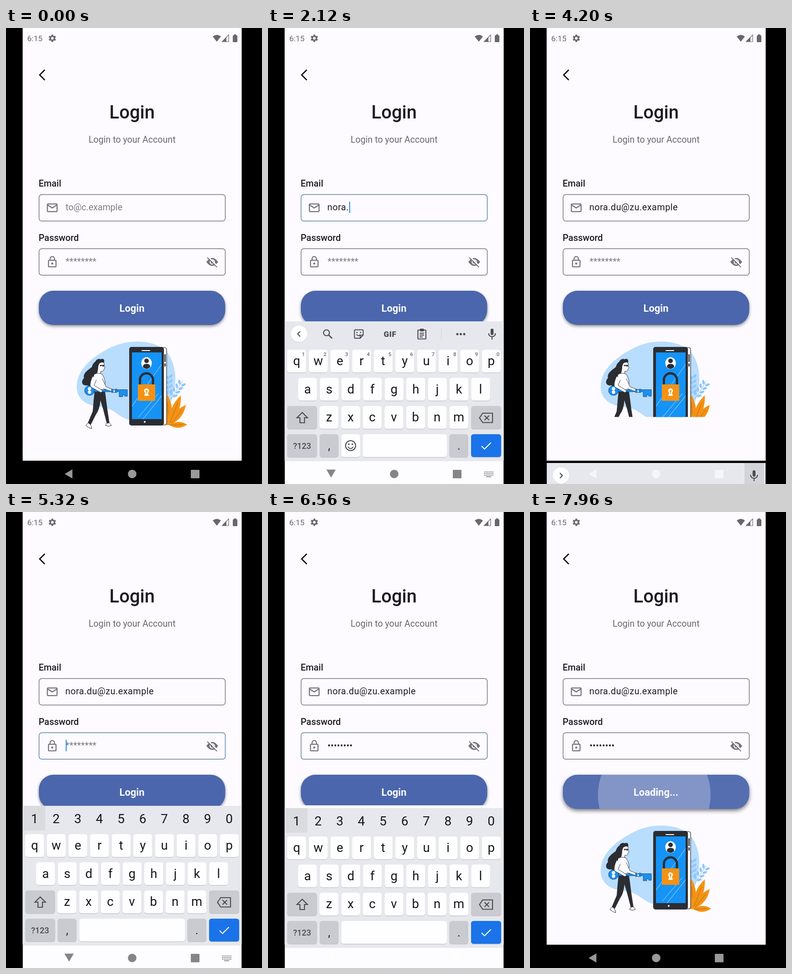
Recreate the animation shown at these times as an HTML page with a canvas. Size 561x998 px, loop 8 s.

```html
<!DOCTYPE html>
<html lang="en">
<head>
<meta charset="utf-8">
<title>Login screen</title>
<style>
html, body { margin: 0; width: 100%; height: 100%; overflow: hidden; background: #000; }
canvas { display: block; width: 561px; height: 998px; }
</style>
</head>
<body>
<canvas id="stage"></canvas>
<script>
const W = 561, H = 998, LOOP = 8000, STEP = 40;
const EMAIL = 'nora.du@zu.example', HINT = 'to@c.example', SECRET = 'password';
const INK = '#1d1b1f', GRAY = '#737277', KEY_INK = '#4a4b50', DARK = '#2b2d33', PAGE = '#fdfbff';
const SESSIONS = [
  { focus: 740, open: 840, close: 4060 },
  { focus: 4940, open: 5040, close: 6540, secret: true }
];
const PRESS = 7440, LOADED = 7840;

const canvas = document.getElementById('stage');
const c = canvas.getContext('2d');
const dpr = window.devicePixelRatio || 1;
canvas.width = W * dpr;
canvas.height = H * dpr;

const clamp = (v, a = 0, b = 1) => Math.min(b, Math.max(a, v));
const easeOut = u => 1 - (1 - clamp(u)) ** 3;

function text(s, x, y, size, color, weight = 400, align = 'left', spacing = 0) {
  c.font = `${weight} ${size}px Roboto, sans-serif`;
  c.letterSpacing = spacing + 'px';
  c.textAlign = align;
  c.fillStyle = color;
  c.fillText(s, x, y);
  const w = c.measureText(s).width;
  c.letterSpacing = '0px';
  return w;
}
function box(x, y, w, h, r, fill, line, lw = 1) {
  c.beginPath();
  c.roundRect(x, y, w, h, r);
  paint(fill, line, lw);
}
function paint(fill, line, lw = 1) {
  if (fill) { c.fillStyle = fill; c.fill(); }
  if (line) { c.strokeStyle = line; c.lineWidth = lw; c.stroke(); }
}
function shape(d, fill, line, lw = 1) {
  const p = new Path2D(d);
  if (fill) { c.fillStyle = fill; c.fill(p); }
  if (line) { c.strokeStyle = line; c.lineWidth = lw; c.stroke(p); }
}
function oval(x, y, rx, ry, rot, fill, line, lw = 1) {
  c.beginPath();
  c.ellipse(x, y, rx, ry, rot, 0, 7);
  paint(fill, line, lw);
}
const disc = (x, y, r, fill, line, lw) => oval(x, y, r, r, 0, fill, line, lw);

function statusBar() {
  const g = '#68676b';
  text('6:15', 46.5, 29, 17.4, g);
  disc(101.5, 22.5, 4.5, null, g, 3.2);
  for (let i = 0; i < 6; i++) {
    const a = i * Math.PI / 3 + Math.PI / 6;
    c.beginPath();
    c.moveTo(101.5 + 5 * Math.cos(a), 22.5 + 5 * Math.sin(a));
    c.lineTo(101.5 + 8 * Math.cos(a), 22.5 + 8 * Math.sin(a));
    paint(null, g, 4);
  }
  shape('M453 18.5Q462 11.5 471 18.5L462 30Z', g);
  shape('M488 15V30H473.5Z', null, g, 1.2);
  shape('M483 20.5V30H473.5Z', g);
  box(497, 16, 10, 15, 1.5, g);
  box(499.5, 14, 5, 3, 0, g);
}

function field(y, focus) {
  const mix = (a, b) => Math.round(a + (b - a) * focus);
  box(72.5, y + .5, 408, 58, 6, null, `rgb(${mix(118, 92)},${mix(116, 128)},${mix(121, 170)})`, 1.5);
}
function mailIcon() {
  box(90.7, 385.2, 21.2, 16.6, 1.3, null, GRAY, 2.3);
  shape('M91 387.2L101.3 393.8L111.6 387.2', null, GRAY, 2.3);
}
function lockIcon() {
  box(93.1, 508.4, 16.5, 14.2, 1.2, null, GRAY, 2.3);
  shape('M96.6 508V504.8A4.7 4.7 0 0 1 106 504.8V508', null, GRAY, 2.2);
  disc(101.3, 515.5, 2.3, GRAY);
}
function hiddenIcon() {
  shape('M439 512Q452 494.5 465 512Q452 529.5 439 512Z', GRAY);
  disc(452, 512, 5.8, PAGE);
  disc(452, 512, 3.5, GRAY);
  shape('M442.5 500.5L464.5 522.5', null, PAGE, 2.6);
  shape('M441 502.2L462.4 523.6', null, GRAY, 2);
}

function button(t) {
  const p = clamp((t - PRESS) / 200);
  c.save();
  c.shadowColor = `rgba(0,0,0,${.42 + .08 * p})`;
  c.shadowBlur = (6 + 2 * p) * dpr;
  c.shadowOffsetY = (3 + p) * dpr;
  box(72, 575, 408.5, 75, 32, '#4b66ac');
  c.restore();
  if (p) {
    c.save();
    box(72, 575, 408.5, 75, 32, `rgba(255,255,255,${.05 * p})`);
    c.clip();
    const r = 50 + 73.5 * Math.sin(clamp((t - PRESS) / 520) * Math.PI / 2);
    disc(272.3, 619, r, `rgba(255,255,255,${.27 * p})`);
    c.restore();
  }
  text(t < LOADED ? 'Login' : 'Loading...', 276, 620.6, 21.9, '#fcfcff', 700, 'center');
}

function leaf(x, y, tipX, tipY, w) {
  const mx = (x + tipX) / 2, my = (y + tipY) / 2;
  const len = Math.hypot(tipX - x, tipY - y);
  const nx = (y - tipY) / len * w, ny = (tipX - x) / len * w;
  shape(`M${x} ${y}Q${mx + nx} ${my + ny} ${tipX} ${tipY}Q${mx - nx} ${my - ny} ${x} ${y}Z`, '#f59214');
  shape(`M${x} ${y}L${mx} ${my}L${(mx + tipX) / 2} ${(my + tipY) / 2}`, null, '#9a641c', .8);
}
function plants() {
  const sky = '#8fc7fb';
  shape('M352 812Q358 790 356 762M362 812Q372 795 386 774', null, sky, 1.3);
  for (let i = 0; i < 4; i++) {
    const y = 762 + i * 11;
    oval(352.5, y + 2, 2.6, 5, -.6, sky);
    oval(361, y, 2.6, 5, .7, sky);
    const x = 385 - i * 6;
    oval(x - 5, 775 + i * 8, 2.6, 5, -.1, sky);
    oval(x + 4, 781 + i * 8, 2.6, 5.2, 1.2, sky);
  }
  leaf(356, 868, 354, 803, 17);
  leaf(358, 867, 383, 804, 16);
  leaf(360, 868, 394, 825, 15);
  leaf(358, 869, 397, 868, 13);
  shape('M351 835Q358 848 360 869H351Z', '#f59214');
}

function phone() {
  box(340, 699, 12, 170, 5, PAGE, DARK, 1.2);
  box(347.2, 714, 2.6, 17, 1, DARK);
  box(347.2, 734, 2.6, 7, 1, DARK);
  box(270, 698, 76, 172, 5, DARK);
  box(276, 710, 65, 146, 0, '#1593f6');
  c.save();
  c.beginPath();
  c.rect(276, 710, 65, 146);
  c.clip();
  shape('M342 735L276 828M334 800L290 852M342 804L300 856', null, 'rgba(190,225,255,.75)', 1.1);
  c.restore();
  box(297, 705, 19, 2, 1, '#fff');
  disc(304, 862, 2, '#fff');
  oval(308, 733.5, 11.5, 13, 0, '#fff');
  disc(308, 728.5, 5, DARK);
  shape('M300 742Q300 735 308 735Q316 735 316 742Q308 750 300 742Z', DARK);
  shape('M293.5 781V770A14.2 14.2 0 0 1 322 770V781', null, DARK, 5);
  box(289, 780, 38, 36, 1, '#f59214');
  disc(308, 794, 5.3, '#fff');
  shape('M305.5 797H310.5L313 805H303Z', '#fff');
  disc(308, 794.5, 2, '#f59214');
  shape('M308 795V801', null, '#f59214', 1.4);
}

function woman() {
  shape('M204 729C195 727 190 735 188 742C181 748 168 755 171 766C163 774 167 784 178 782C186 787 194 780 193 771C199 763 200 752 206 742Z', DARK);
  shape('M201 733Q207 728 215 733L215 738L217 744L215 746Q214 753 208 751L207 758H198Q203 748 201 733Z', PAGE, DARK, .9);
  shape('M195 737C194 727 201 722 208 725C212 722 217 726 215 732Q208 731 204 735L201 744Z', DARK);
  shape('M205 737.5H215V740Q212 742.5 210 739Q207 742 205 737.5Z', DARK);
  shape('M193 758Q203 753 211 758Q220 773 216 783L217 796H194Q195 784 190 775Z', PAGE, DARK, .9);
  shape('M194 795H217Q220 818 222 834L227 866H221L213 835L207 815Q205 836 197 846L186 868L179 865L190 839Q192 815 194 795Z', DARK);
  shape('M180 864L175 870Q182 876 188 877Q188 872 184 867ZM221 865L218 870Q225 873 231 870Q229 866 226 864Z', PAGE, DARK, 1);
}
function bigKey() {
  const blue = '#1b8ff0', edge = '#174a7c';
  oval(183, 793.5, 10.8, 10.5, 0, blue, edge, 1);
  disc(183, 789.5, 3.7, '#fff');
  disc(183, 797, 3.7, '#fff');
  shape('M193 791.5H266V806H260V803H256V807H248V796H193Z', blue, edge, .9);
  shape('M190 762Q183 776 185 785L208 798L212 794L193 782L198 770', PAGE, DARK, .9);
  shape('M211 767L219 785L233 791L241 793L238 798L213 789', PAGE, DARK, .9);
  box(231, 790, 4, 8, 1, blue, edge, .8);
  box(239, 790, 4, 8, 1, blue, edge, .8);
}
function picture() {
  shape('M272 858C246 853 241 833 206 829C172 826 154 810 155 783C157 741 198 715 232 698C275 679 326 684 351 707C366 725 372 750 371 772C369 800 362 825 345 850Z', '#b8ddfd');
  plants();
  phone();
  woman();
  bigKey();
}

function key(x, y, w, fill = '#fefdff') {
  box(x, y + 1.2, w, 50, 5.5, '#bfc1c6');
  box(x, y, w, 50, 5.5, fill);
}
function micIcon() {
  box(487.8, 658, 6.4, 14, 3.2, KEY_INK);
  shape('M483.5 668Q484 675.5 491 675.5Q498 675.5 498.5 668M491 675.5V682', null, KEY_INK, 2.2);
}
function toolbar(t, composing) {
  if (composing) box(470, 642, 43, 55, 0, '#d2d4d9');
  else if (t < 1600) box(96, 642, 68, 54, 0, '#d5d7db');
  disc(68, 670.6, 18, '#c9cbd0');
  disc(68, 669.6, 18, '#fefdff');
  shape(composing ? 'M65.5 664L71 669.6L65.5 675.2' : 'M70.5 664L65 669.6L70.5 675.2', null, KEY_INK, 2.2);
  micIcon();
  if (composing) return;
  disc(128.2, 667, 6.5, null, KEY_INK, 2.2);
  shape('M133 672L140.5 679.5', null, KEY_INK, 2.6);
  shape('M191 660.5H207Q208.5 660.5 208.5 662V672L202 679H191Q189.5 679 189.5 677.5V662Q189.5 660.5 191 660.5ZM202 679V672.5H208.5M194 670.5Q198 676 202 671', null, KEY_INK, 2);
  disc(195, 666.5, 1.4, KEY_INK);
  disc(203, 666.5, 1.4, KEY_INK);
  text('GIF', 267.5, 675.5, 17, KEY_INK, 900, 'center', .6);
  box(328.5, 661, 17.5, 19.5, 1.5, null, KEY_INK, 2.2);
  box(333, 658, 8.5, 6, 1.5, KEY_INK);
  shape('M332.5 668H342M332.5 672H342M332.5 676H339', null, KEY_INK, 1.8);
  box(379.5, 656, 1, 27, 0, '#cfd1d6');
  for (const x of [415, 422.5, 430]) disc(x, 670, 2.5, KEY_INK);
}
function keyRow(letters, x, y, marks) {
  [...letters].forEach((ch, i) => {
    const kx = x + i * 47.4;
    key(kx, y, 41.5);
    text(ch, kx + 20.7, y + 34, 27.5, '#161619', 400, 'center');
    if (marks) text((i + 1) % 10, kx + 35.5, y + 13.5, 11.5, '#67686d', 500, 'center');
  });
}
function keyboard(t, s, composing) {
  const gray = '#c9cbd1';
  box(36.5, 642, 480, 306, 0, '#e6e8ed');
  box(36.5, 948, 480, 50, 0, '#fdfcff');
  if (s.secret) {
    box(39, 642, 47, 54, 0, '#d9dbdf');
    for (let i = 0; i < 10; i++) text((i + 1) % 10, 62.5 + i * 47.4, 680, 28, '#161619', 400, 'center');
  } else toolbar(t, composing);
  keyRow('qwertyuiop', 42, 704, !s.secret);
  keyRow('asdfghjkl', 66, 765.5);
  keyRow('zxcvbnm', 113, 827.3);
  key(42, 827.3, 65.5, gray);
  key(445, 827.3, 66, gray);
  shape('M75 841.5L86.5 853H80V864H70V853H63.5Z', null, KEY_INK, 2.2);
  shape('M470.5 843H492V863.5H470.5L463.5 853.2ZM474.5 848.2L484.5 858.2M484.5 848.2L474.5 858.2', null, KEY_INK, 2.2);
  key(42, 889, 65.5, gray);
  text('?123', 74.7, 921, 18, KEY_INK, 500, 'center');
  key(113, 889, 41.5, gray);
  text(',', 134, 923, 25, '#242428', 400, 'center');
  if (!s.secret) {
    key(160.5, 889, 41.5);
    disc(181, 914, 11, null, KEY_INK, 2.1);
    disc(177.2, 911, 1.8, KEY_INK);
    disc(184.8, 911, 1.8, KEY_INK);
    shape('M175 916.5Q181 924.5 187 916.5', null, KEY_INK, 2);
  }
  const space = s.secret ? 160.5 : 207.5;
  key(space, 889, 392 - space);
  key(397.5, 889, 41.5, gray);
  text('.', 418.3, 923, 25, '#242428', 400, 'center');
  key(445, 889, 66, '#1a73e8');
  shape('M468 915L474.5 921.5L488.5 907.5', null, '#fff', 2.2);
}

function navIcons(light) {
  const col = light ? '#858588' : 'rgba(255,255,255,.6)';
  shape(light ? 'M128 966.5H148.5L138.2 984Z' : 'M128.5 976L145.5 966V986Z', col);
  disc(276.5, 976, 9.3, col);
  box(405, 967, 19, 18.5, 1, col);
  if (!light) return;
  for (let r = 0; r < 3; r++)
    for (let i = 0; i < 6; i++) box(473.5 + i * 3.6, 970.5 + r * 3.6, 2.2, 2.2, 0, col);
  box(478, 981.3, 11, 1.8, 0, col);
}

const slide = (s, t) => {
  if (!s) return 356;
  if (t >= s.close) return 356 * clamp((t - s.close) / 150) ** 2;
  return 356 * (1 - easeOut((t - s.open) / 320));
};
const focusOf = (s, t) => clamp((t - s.focus) / 150) * (1 - clamp((t - s.close) / 100));

function emailTyping(t) {
  const second = t >= 2240;
  const start = second ? 2240 : 1600, step = second ? 130 : 120;
  const k = Math.floor((t - start) / step);
  const n = clamp(k + 1 + (second ? 5 : 0), 0, second ? EMAIL.length : 5);
  const last = n ? start + step * Math.min(k, second ? 12 : 4) : SESSIONS[0].focus;
  return { n, last };
}
function secretTyping(t) {
  const k = Math.floor((t - 5660) / 120);
  const n = clamp(k + 1, 0, SECRET.length);
  return { n, last: n ? 5660 + 120 * (n - 1) : SESSIONS[1].focus };
}
function caret(s, t, last, x, y) {
  if (t < s.focus || t >= s.close || (t - last) % 1000 >= 500) return;
  box(x, y, 2.2, 25, 0, '#2f93e4');
}

function draw(t) {
  c.setTransform(dpr, 0, 0, dpr, 0, 0);
  box(0, 0, W, H, 0, '#000');
  box(36.5, 0, 480, 947, 0, PAGE);
  statusBar();

  const s = SESSIONS.find(v => t >= v.open && t < v.close + 150);
  const shift = Math.round(slide(s, t));

  // The page body is cut where the keyboard inset was a moment ago.
  c.save();
  c.beginPath();
  c.rect(36.5, 0, 480, Math.min(947, 642 + slide(s, t - 25)));
  c.clip();
  shape('M85 91.5L73.8 102.8L85 114', null, '#111', 2.8);
  text('Login', 276.3, 198.2, 40, INK, 500, 'center');
  text('Login to your Account', 276.3, 250.8, 19.6, '#69686d', 400, 'center');
  text('Email', 71.5, 347, 19.9, INK, 500);
  text('Password', 71.5, 465.5, 19.9, INK, 500);
  field(364, focusOf(SESSIONS[0], t));
  field(482.5, focusOf(SESSIONS[1], t));
  mailIcon();
  lockIcon();
  hiddenIcon();

  const mail = emailTyping(t), pass = secretTyping(t);
  let w = 0;
  if (mail.n) w = text(EMAIL.slice(0, mail.n), 130, 399, 19.8, INK, 400, 'left', .5);
  else text(HINT, 130.5, 399, 19.6, '#7d7c81');
  caret(SESSIONS[0], t, mail.last, 130.8 + w, 380);

  w = 0;
  if (pass.n) {
    const plain = t < SESSIONS[1].close;
    const shown = plain ? '•'.repeat(pass.n - 1) + SECRET[pass.n - 1] : '•'.repeat(pass.n);
    w = text(shown, 130.5, 517.5, 19.8, INK, 400, 'left', .2);
  } else text('********', 130.5, 518, 19.6, '#7d7c81');
  caret(SESSIONS[1], t, pass.last, 130.8 + w, 498.5);

  button(t);
  picture();
  c.restore();

  if (s) {
    c.save();
    c.beginPath();
    c.rect(36.5, 0, 480, H);
    c.clip();
    c.translate(0, shift);
    keyboard(t, s, mail.n > 0 && EMAIL[mail.n - 1] !== '.');
    c.restore();
  }
  navIcons(s && t > s.open + 120 && t < s.close);
}

const begin = performance.now();
function frame() {
  const t = (performance.now() - begin + 2) % LOOP;
  draw(Math.floor(t / STEP) * STEP);
  requestAnimationFrame(frame);
}
frame();
</script>
</body>
</html>
```
